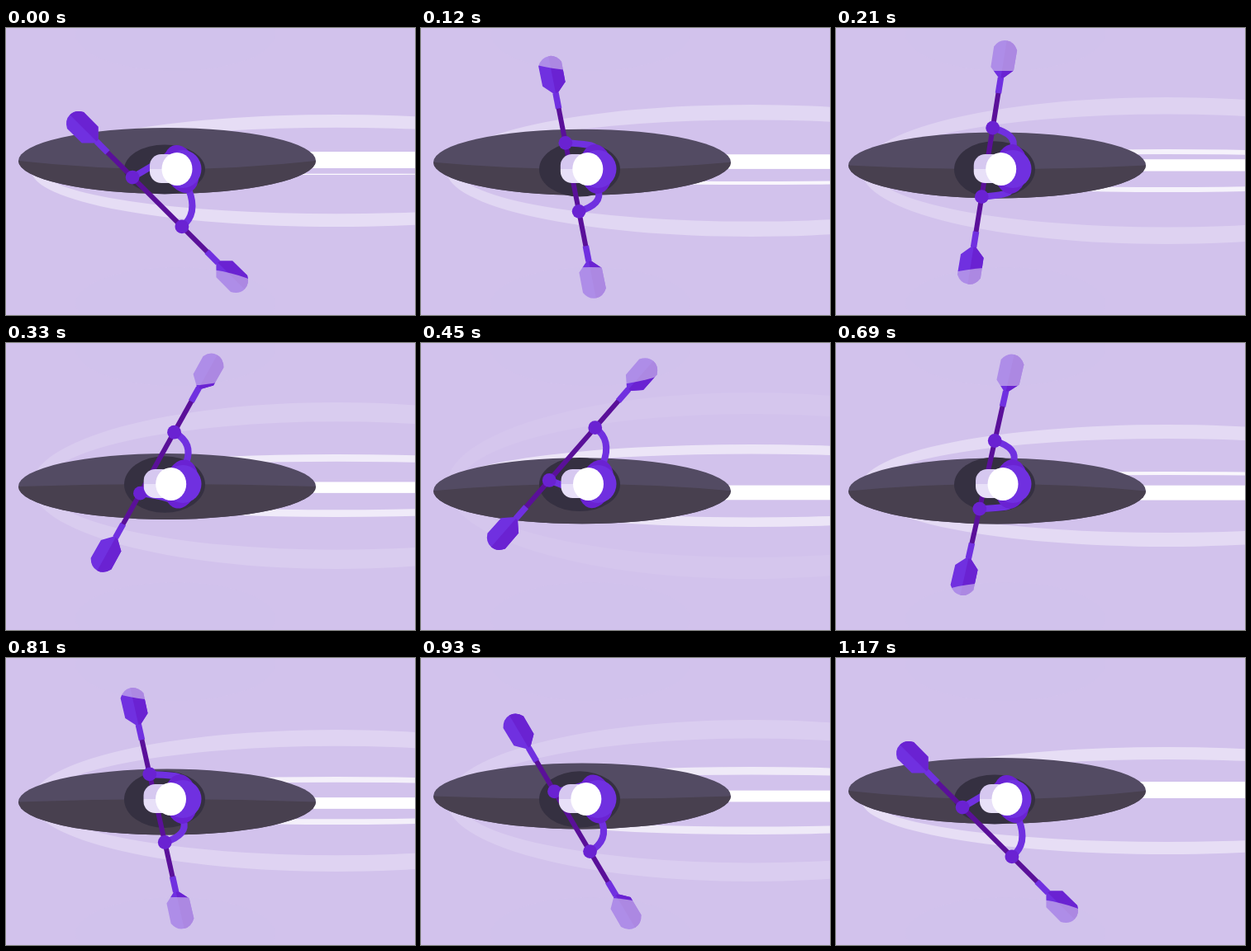
Animation, 495 px wide and 348 px high, one loop 1200 ms. Source, as an HTML page with a canvas:

```html
<!DOCTYPE html>
<html lang="en">
<head>
<meta charset="utf-8">
<title>Kayak</title>
<style>
  html, body { margin: 0; width: 100%; height: 100%; overflow: hidden; background: #d2c2ec; }
  canvas { display: block; width: 495px; height: 348px; }
</style>
</head>
<body>
<canvas id="stage" width="495" height="348"></canvas>
<script>
const g = document.getElementById('stage').getContext('2d');
const TAU = Math.PI * 2;
const LOOP = 1200, STEP = 30, TURN = 570, REST = 1170;
const MID = 171;
const C = {
  water: '#d2c2ec', deck: '#534b63', hull: '#48404f', pit: '#353041',
  light: '#7030e0', dark: '#6a22d2', shaft: '#5a1099',
  visor: '#d6c8f0', visorLow: '#e8e0f8'
};

const outQuad = p => 1 - (1 - p) ** 2;
const inOutQuad = p => p < .5 ? 2 * p * p : 1 - 2 * (1 - p) ** 2;
const mix = (a, b, k) => a + (b - a) * k;

function fillPath(color, build) {
  g.fillStyle = color;
  g.beginPath();
  build();
  g.fill();
}

function ellipse(color, x, y, rx, ry, rot = 0) {
  fillPath(color, () => g.ellipse(x, y, rx, ry, rot, 0, TAU));
}

function line(color, width, build) {
  g.strokeStyle = color;
  g.lineWidth = width;
  g.beginPath();
  build();
  g.stroke();
}

// A ring that widens from the boat and fades over one loop.
function wake(age) {
  if (age < STEP) return;
  const h = age / 10;
  g.globalAlpha = 1 - age / LOOP;
  g.fillStyle = '#fff';
  g.beginPath();
  g.ellipse(400, 173, 369, h, 0, 0, TAU);
  g.ellipse(400, 173, 354, h * .77, 0, 0, TAU);
  g.fill('evenodd');
  g.globalAlpha = 1;
}

function trail(q) {
  const y = mix(160, 183.5, q);
  const h = 12.8 + 7.2 * (1 - 2 * q) ** 2;
  g.fillStyle = '#fff';
  g.fillRect(300, y - h / 2, 195, h);
}

function boat(q, swing) {
  const y = mix(161, 181, q);
  ellipse(C.deck, 195, y, 180, 40);
  fillPath(C.hull, () => {
    g.ellipse(195, y, 180, 40, 0, 0, Math.PI);
    g.quadraticCurveTo(195, 2 * MID - y, 375, y);
  });
  ellipse(C.pit, 192, 171.5, 49, 30 + 4.5 * swing);
}

function blade(dir) {
  const half = side => {
    g.moveTo(0, dir * 101);
    g.lineTo(side * 14, dir * 115);
    g.lineTo(side * 14.2, dir * 140);
    g.quadraticCurveTo(side * 9, dir * 149.5, 0, dir * 149.5);
  };
  fillPath(C.light, () => { half(-1); half(1); });
  fillPath(C.dark, () => half(1));
  line(C.light, 7.5, () => {
    g.moveTo(0, dir * 85);
    g.lineTo(0, dir * 104);
  });
}

function paddle(y, angle) {
  g.save();
  g.translate(183, y);
  g.rotate(angle);
  line(C.shaft, 6, () => { g.moveTo(0, -88); g.lineTo(0, 88); });
  blade(-1);
  blade(1);
  g.restore();
}

function arm(side, py, angle, lean) {
  const hx = 183 - side * 42.3 * Math.sin(angle);
  const hy = py + side * 42.3 * Math.cos(angle);
  const sx = 212 - side * 26 * Math.sin(lean);
  const sy = MID + side * 26 * Math.cos(lean);
  const k = .35 + .04 * Math.max(0, side * (MID - hy));
  line(C.light, 8, () => {
    g.moveTo(hx, hy);
    g.quadraticCurveTo(mix(hx, sx, .62) + 15, mix(hy, sy, k), sx, sy);
  });
  ellipse(C.dark, hx, hy, 8.4, 8.4);
}

function rider(py, angle, swing) {
  const lean = angle * .45;
  const x = 207 - 7.7 * swing;
  arm(-1, py, angle, lean);
  arm(1, py, angle, lean);
  ellipse(C.dark, 212, MID, 20, 30, lean);
  ellipse(C.light, 214, MID, 22.5, 23);

  g.save();
  g.beginPath();
  g.roundRect(x - 33, 153, 36, 35, 14);
  g.clip();
  g.fillStyle = C.visor;
  g.fillRect(150, 150, 80, 21);
  g.fillStyle = C.visorLow;
  g.fillRect(150, MID, 80, 20);
  g.restore();
  ellipse('#fff', x, MID, 18.5, 20);
}

function draw(t) {
  const back = t >= TURN;
  const p = back ? Math.min(1, (t - TURN) / (REST - TURN)) : t / TURN;
  const stroke = back ? 1 - outQuad(p) : outQuad(p);
  const drift = back ? 1 - inOutQuad(p) : inOutQuad(p);
  const swing = Math.sin(Math.PI * p ** .93);
  const angle = mix(-1, 1, stroke) * Math.PI / 4;
  const py = mix(211, 131, stroke);

  g.fillStyle = C.water;
  g.fillRect(0, 0, 495, 348);
  wake((t + 50) % LOOP);
  wake((t + 680) % LOOP);
  trail(drift);
  boat(drift, swing);
  paddle(py, angle);
  rider(py, angle, swing);

  // Water that covers the dipped blades
  g.globalAlpha = .64;
  ellipse(C.water, 205, 8, 121, 44);
  ellipse(C.water, 205, 334, 121, 44);
  g.globalAlpha = 1;
}

const start = performance.now();
function tick() {
  const t = (performance.now() - start) % LOOP;
  draw(Math.floor(t / STEP) * STEP);
  requestAnimationFrame(tick);
}
tick();
</script>
</body>
</html>
```
